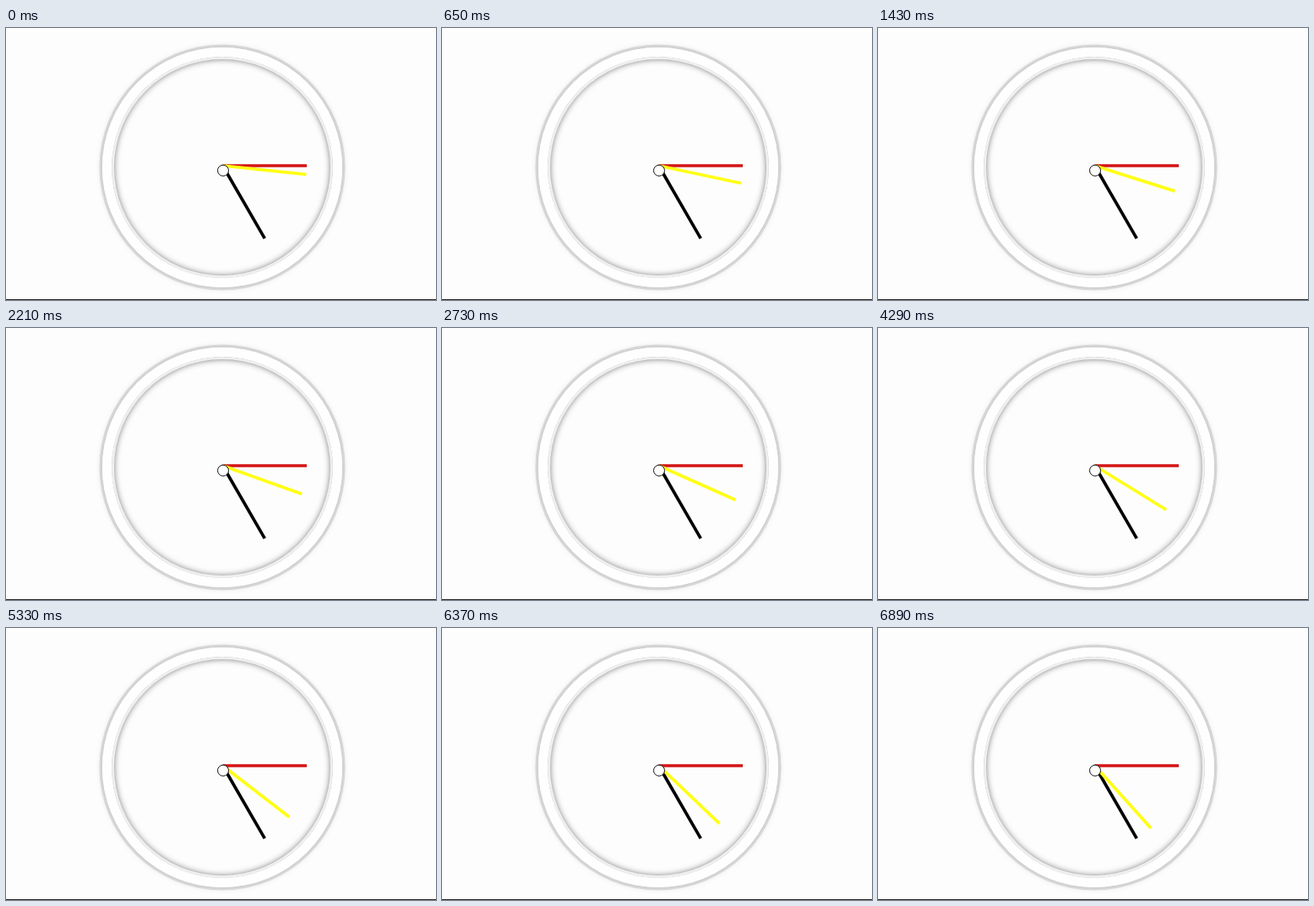
Write an HTML page that moves like this. It is 509x322 px and loops after 7280 ms.

```html
<!DOCTYPE html>
<html lang="en">
<head>
<meta charset="utf-8">
<title>Clock</title>
<style>
html, body { margin: 0; width: 100%; height: 100%; overflow: hidden; background: #fdfdfd; }
.face {
  position: absolute; left: 114px; top: 22.5px; width: 284px; height: 284px;
  box-sizing: border-box; border: 11px solid #fefefe; border-radius: 50%;
  box-shadow:
    0 0 0 3.6px rgba(0, 0, 0, .11),
    inset 0 0 0 3px #efefef,
    inset 0 0 10px #000,
    0 0 8px rgba(0, 0, 0, .18);
}
svg { position: absolute; left: 0; top: 0; }
.floor { position: absolute; left: 0; top: 321px; width: 509px; height: 1px; background: #222; }
</style>
</head>
<body>
<div class="face"></div>
<svg width="509" height="322" viewBox="0 0 509 322">
  <g stroke-width="3.7">
    <path id="hour" d="M0 0H99.5" stroke="#000"/>
    <path id="minute" d="M0 0H99.5" stroke="#d41414"/>
    <path id="second" d="M0 0H99.5" stroke="#ffff14"/>
  </g>
  <circle cx="257" cy="168.7" r="6.5" fill="#fff" stroke="#111" stroke-width="1"/>
</svg>
<div class="floor"></div>
<script>
const STEP = 130, LOOP = 7280, STEPS_PER_TICK = 8;
const TICK_MS = 520, LEAD = 100;

function turn(id, angle) {
  document.getElementById(id).setAttribute("transform", `translate(256.5 163) rotate(${angle})`);
}

// cubic-bezier(.25, .1, .25, 1), solved by bisection
function ease(x) {
  if (x <= 0) return 0;
  if (x >= 1) return 1;
  const curve = (a, b, u) => 3 * a * u * (1 - u) ** 2 + 3 * b * u * u * (1 - u) + u ** 3;
  let lo = 0, hi = 1;
  for (let i = 0; i < 24; i++) {
    const mid = (lo + hi) / 2;
    if (curve(.25, .25, mid) < x) lo = mid; else hi = mid;
  }
  return curve(.1, 1, lo);
}

function secondAngle(time) {
  const step = Math.floor(time / STEP) - 1;
  if (step < 0) return 6;
  const tick = Math.floor(step / STEPS_PER_TICK);
  const elapsed = (step % STEPS_PER_TICK) * STEP + LEAD;
  return 6 + 6 * (tick + ease(elapsed / TICK_MS));
}

function draw(time) {
  turn("second", secondAngle(time % LOOP));
}

turn("hour", 60);
turn("minute", 0);
draw(0);

const start = performance.now();
function loop() {
  draw(performance.now() - start);
  requestAnimationFrame(loop);
}
requestAnimationFrame(loop);
</script>
</body>
</html>
```
